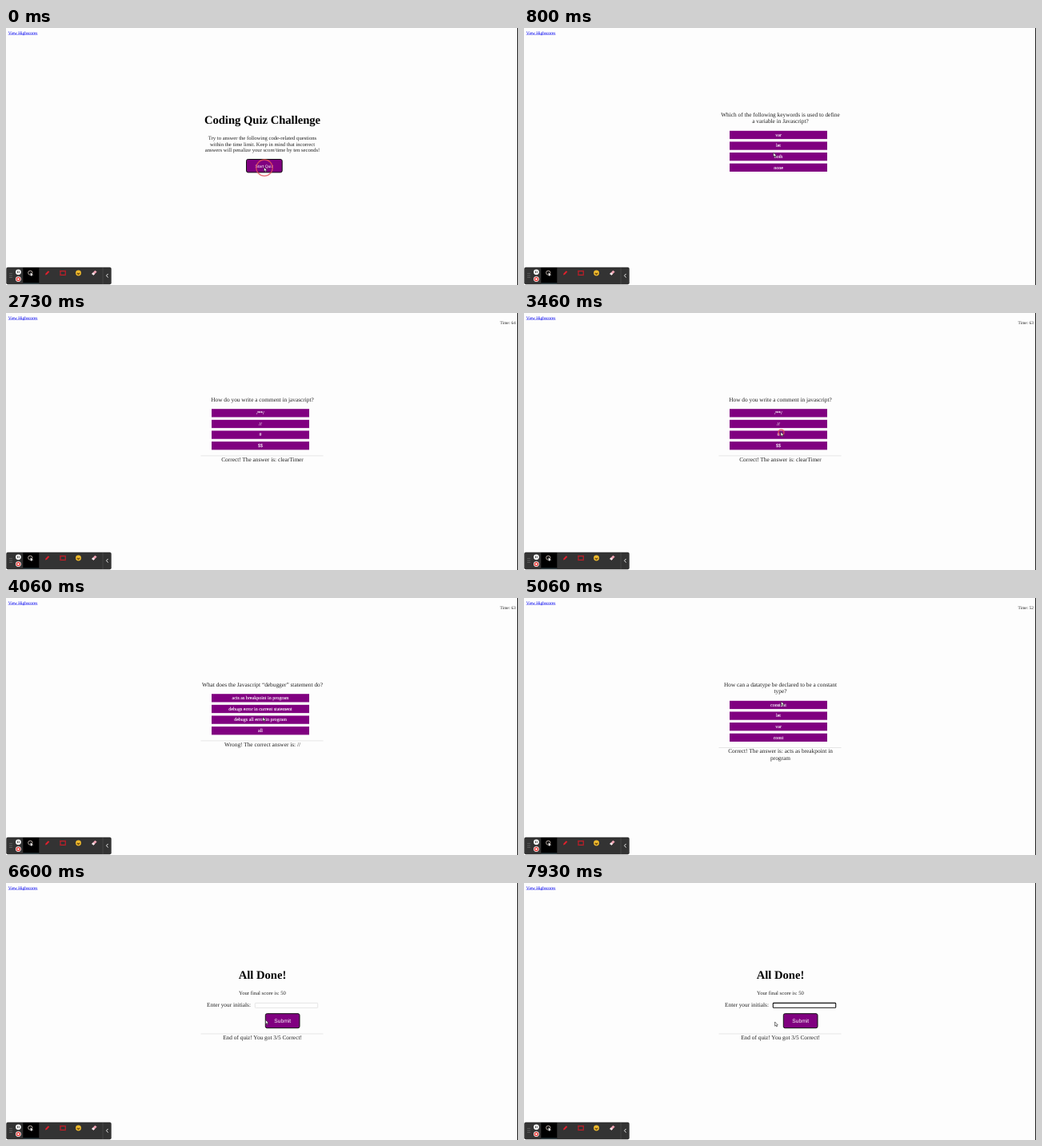
These frames come from a looping animation (640x322 px, 8000 ms). An HTML page:

```html
<!DOCTYPE html>
<html lang="en">
<head>
<meta charset="utf-8">
<title>Coding Quiz Challenge</title>
<style>
  html, body { margin: 0; width: 100%; height: 100%; overflow: hidden; background: #fdfdfd; }
  svg { display: block; width: 100vw; height: 100vh; }
  text {
    font-family: "Liberation Serif", "Times New Roman", serif;
    font-size: 7.333px; fill: #222; text-anchor: middle;
    text-rendering: geometricPrecision;
  }
  .title { font-size: 14.6px; font-weight: bold; fill: #000; }
  .body { font-size: 6.667px; }
  .small { font-size: 5.333px; }
  .option { font-size: 6px; fill: #fff; stroke: #fff; stroke-width: .12px; }
  .button, .label { font-family: "Liberation Sans", Arial, sans-serif; fill: #fff; }
  .label { font-size: 3.05px; font-weight: bold; }
  .left { text-anchor: start; }
  .right { text-anchor: end; }
  .scene { display: none; }
  .scene.on { display: inline; }
</style>
</head>
<body>
<svg viewBox="0 0 640 322" preserveAspectRatio="none">
  <rect width="640" height="322" fill="#fdfdfd"/>
  <rect x="639" width="1" height="322" fill="#222"/>
  <text x="2.7" y="7.5" class="small left" style="fill:#00e">View Highscores</text>
  <path d="M2.7 8.2H39.5" stroke="#00e" stroke-width=".45"/>
  <text id="timer" x="636.8" y="13.6" class="small right"></text>
  <g id="scenes"></g>

  <g id="toolbar">
    <rect x=".3" y="299.7" width="131.4" height="21.6" rx="2" fill="#333"/>
    <rect x="21.3" y="300.3" width="20" height="19.8" fill="#000"/>
    <path d="M21.3 320H41.3" stroke="#4b6a78" stroke-width=".7"/>
    <path d="M5 307.3V314M7 307.3V314" stroke="#aaa" stroke-width=".8" stroke-dasharray=".8 1.6"/>
    <circle cx="15.4" cy="305.8" r="3.4" fill="#fff"/>
    <path d="M14.5 304.4V307.2M16.3 304.4V307.2" stroke="#333" stroke-width=".8"/>
    <circle cx="15.4" cy="314.6" r="3.4" fill="#fff"/>
    <circle cx="15.4" cy="314.6" r="2.7" fill="#e53935"/>
    <rect x="14.3" y="313.5" width="2.2" height="2.2" fill="#fff"/>
    <circle cx="30.3" cy="306.7" r="2.6" fill="none" stroke="#e8d8d0" stroke-width=".8"/>
    <path d="M30.3 306.2L34 309.5L32.2 309.7L31.2 311.2Z" fill="#fff"/>
    <path d="M49 309.6L49.6 307.6L52.8 304.2L54.3 305.6L51 309Z" fill="#e0202c"/>
    <rect x="68" y="304.5" width="6.2" height="5" fill="none" stroke="#e0202c" stroke-width=".9"/>
    <path d="M67.3 303.8h1.6v1.6h-1.6zM73.3 303.8h1.6v1.6h-1.6zM67.3 308.7h1.6v1.6h-1.6zM73.3 308.7h1.6v1.6h-1.6z" fill="#b81822"/>
    <circle cx="90.5" cy="307" r="3.4" fill="#f9c22e"/>
    <path d="M89.3 305.6v.9M91.7 305.6v.9M88.6 307.6Q90.5 310.3 92.4 307.6Z" stroke="#6b4510" stroke-width=".6" fill="#6b4510"/>
    <path d="M107.2 308L111.3 303.8L113.6 305.6L109.4 309.8Z" fill="#f2a5b5"/>
    <path d="M107.2 308L108.7 306.5L111 308.3L109.4 309.8Z" fill="#eee"/>
    <path d="M121 300V321" stroke="#555" stroke-width=".6"/>
    <path d="M127.5 308L125.5 310.3L127.5 312.6" fill="none" stroke="#fff" stroke-width=".9"/>
  </g>

  <circle id="ring" fill="none" stroke="#e2525c" stroke-width="1.3"/>
  <path id="cursor" d="M0 0V5.2L1.2 4.2L2 6L2.9 5.6L2.1 3.9H3.7Z" fill="#fff" stroke="#222" stroke-width=".6"/>
</svg>

<script>
const LOOP = 8000;
const MID = 320.5;
const $ = id => document.getElementById(id);

const text = (s, x, y, cls = '') => `<text x="${x}" y="${y}" class="${cls}">${s}</text>`;
const lines = (list, y, step, cls) =>
  list.map((s, i) => text(s, MID, y + i * step, cls)).join('');
const rule = y => `<path d="M243.5 ${y}H396.5" stroke="#dcdcdc" stroke-width=".7"/>`;
const button = (x, y, w, h) =>
  `<rect x="${x}" y="${y}" width="${w}" height="${h}" rx="2" fill="purple" stroke="#111" stroke-width="1"/>`;

function question(ask, options, verdict = []) {
  const top = 111.6 + ask.length * 8.6;
  const rows = options.map((label, i) => {
    const y = top + i * 13.63;
    return `<rect x="257" y="${y}" width="122" height="10.3" fill="purple"/>` +
      text(label, 318, y + 6.9, 'option');
  }).join('');
  const end = top + 58.7;
  return lines(ask, 110.6, 8.6) + rows +
    (verdict.length ? rule(end) + lines(verdict, end + 6.6, 8.6) : '');
}

const intro = text('Coding Quiz Challenge', MID, 120.3, 'title') +
  lines(['Try to answer the following code-related questions',
    'within the time limit. Keep in mind that incorrect',
    'answers will penalize your score/time by ten seconds!'], 140, 7.65, 'body') +
  button(300.5, 164.5, 44.7, 16.4) +
  '<text x="322.8" y="174.5" class="button" style="font-size:5.05px">Start Quiz</text>';

const done = text('All Done!', MID, 120.3, 'title') +
  text('Your final score is: 50', MID, 140, 'body') +
  text('Enter your initials:', 251, 155.1, 'left') +
  '<rect id="field" x="311.3" y="150.4" width="78.4" height="5.9" rx=".8" fill="#fff"/>' +
  button(324.3, 163.7, 42.7, 18) +
  '<text x="345.7" y="174.9" class="button" style="font-size:6.667px">Submit</text>' +
  rule(189) + text('End of quiz! You got 3/5 Correct!', MID, 195.8);

const scenes = [
  [0, intro],
  [130, question(['Which of the following keywords is used to define', 'a variable in Javascript?'],
    ['var', 'let', 'both', 'none'])],
  [1400, question(['How do you stop a timer in Javascript?'],
    ['stopTimer', 'clearTimer', 'endTimer', 'none'],
    ['Wrong! The correct answer is: both'])],
  [2530, question(['How do you write a comment in javascript?'],
    ['/**/', '//', '#', '$$'],
    ['Correct! The answer is: clearTimer'])],
  [3730, question(['What does the Javascript “debugger” statement do?'],
    ['acts as breakpoint in program', 'debugs error in current statement',
      'debugs all error in program', 'all'],
    ['Wrong! The correct answer is: //'])],
  [4800, question(['How can a datatype be declared to be a constant', 'type?'],
    ['constant', 'let', 'var', 'const'],
    ['Correct! The answer is: acts as breakpoint in', 'program'])],
  [6330, done]
];
$('scenes').innerHTML = scenes.map(([, body]) => `<g class="scene">${body}</g>`).join('');
const groups = [...document.querySelectorAll('.scene')];

const FOCUS = 7400;
const ticks = [[1130, 75], [2130, 64], [3130, 63], [4130, 52], [5130, 51], [6130, 50]];

// time, x, y of the pointer tip
const path = [
  [0, 322.5, 174.5], [260, 322.5, 174.5], [800, 311.8, 156], [1100, 313, 146.5],
  [1500, 313, 146.5], [2100, 317, 137.5], [2530, 317, 137.5], [3000, 319, 143],
  [3400, 321, 149], [4060, 321, 149], [4500, 321.5, 129.5], [5060, 321.5, 129.5],
  [5900, 324.5, 171.5], [6600, 324.5, 171.5], [7150, 332, 152.5],
  [7500, 332, 152.5], [7900, 313.6, 174], [8000, 313.6, 174]
];
const clicks = [...scenes.slice(1).map(s => s[0]), FOCUS];

function pointer(t) {
  const i = Math.max(1, path.findIndex(p => p[0] >= t));
  const [t0, x0, y0] = path[i - 1], [t1, x1, y1] = path[i];
  const k = (t - t0) / (t1 - t0), e = k * k * (3 - 2 * k);
  return [x0 + (x1 - x0) * e, y0 + (y1 - y0) * e];
}

function draw(now) {
  const t = now % LOOP;
  const current = scenes.filter(s => s[0] <= t).length - 1;
  groups.forEach((g, i) => g.classList.toggle('on', i === current));

  const tick = ticks.filter(k => k[0] <= t).pop();
  $('timer').textContent = tick && current < scenes.length - 1 ? `Time: ${tick[1]}` : '';

  const focused = t >= FOCUS;
  $('field').setAttribute('stroke', focused ? '#111' : '#d4d4d4');
  $('field').setAttribute('stroke-width', focused ? 1.1 : .6);

  const [x, y] = pointer(t);
  $('cursor').setAttribute('transform', `translate(${x} ${y})`);
  $('cursor').style.display = t >= 2530 && t < 3000 ? 'none' : '';

  const age = clicks.map(c => t - c + 330).find(a => a >= 0 && a < 400);
  const ring = $('ring');
  ring.style.display = age === undefined ? 'none' : '';
  if (age !== undefined) {
    ring.setAttribute('cx', x + .5);
    ring.setAttribute('cy', y + .7);
    ring.setAttribute('r', 10.2 * Math.min(1, age / 180));
    ring.setAttribute('opacity', .85 * Math.min(1, (400 - age) / 180));
  }
}

const start = performance.now();
function frame() {
  draw(performance.now() - start);
  requestAnimationFrame(frame);
}
frame();
</script>
</body>
</html>
```
